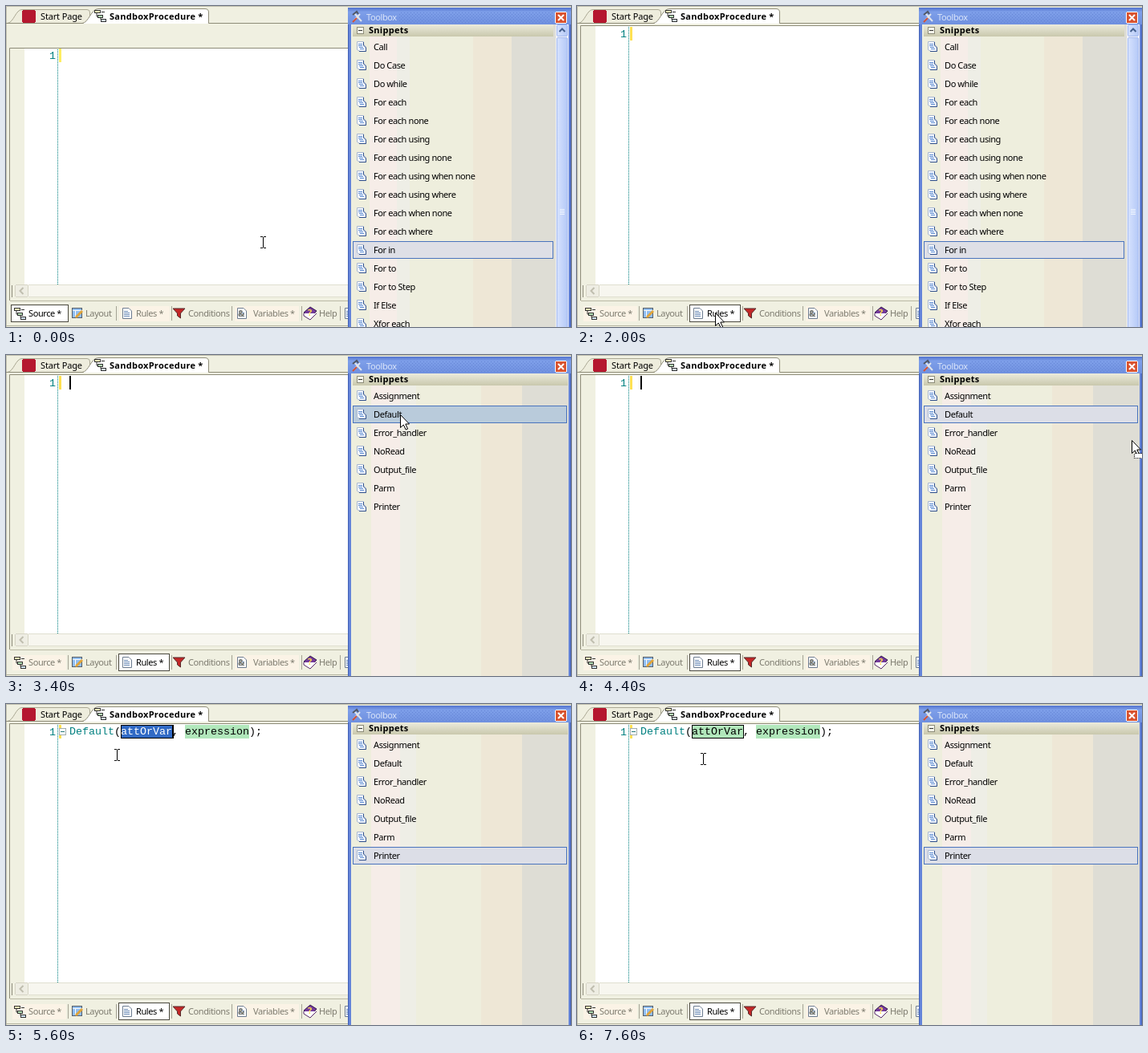
An HTML page for the animation above (8000 ms loop, 704 by 400 pixels).

```html
<!DOCTYPE html>
<html lang="en">
<head>
<meta charset="utf-8">
<title>Snippet toolbox</title>
<style>
html, body { margin: 0; width: 100%; height: 100%; overflow: hidden; background: #f0f0e1; }
svg { display: block; width: 704px; height: 400px; }
text { font: 11px "Noto Sans", "Open Sans", sans-serif; letter-spacing: -.4px; white-space: pre; }
.bold { font-weight: 700; letter-spacing: .27px; }
.code { font: 13.33px "Liberation Mono", "Courier New", monospace; letter-spacing: 0; }
.teal { fill: #008080; }
.dim text { fill: #7d7b6f; }
rect, line, .crisp { shape-rendering: crispEdges; }
.t { animation: 8s step-end infinite; }

/* panes */
.source { animation-name: source }
.rules { animation-name: rules }
.listA { animation-name: listA }
.listB { animation-name: listB }
.hover { animation-name: hover }
.picked { animation-name: picked }
.inserted { animation-name: inserted }
.selected { animation-name: selected }
@keyframes source { 0% { opacity: 1 } 25%, to { opacity: 0 } }
@keyframes rules { 0% { opacity: 0 } 25%, to { opacity: 1 } }
@keyframes listA { 0% { opacity: 1 } 27.5%, to { opacity: 0 } }
@keyframes listB { 0% { opacity: 0 } 27.5%, to { opacity: 1 } }
@keyframes hover { 0% { opacity: 0 } 40% { opacity: 1 } 47.5%, to { opacity: 0 } }
@keyframes picked { 0% { opacity: 0 } 47.5% { opacity: 1 } 67.5%, to { opacity: 0 } }
@keyframes inserted { 0% { opacity: 0 } 67.5%, to { opacity: 1 } }
@keyframes selected { 0% { opacity: 0 } 67.5% { opacity: 1 } 87.5%, to { opacity: 0 } }

/* blinking carets */
.caretStart { animation-name: caretStart }
.caretEnd { animation-name: caretEnd }
.caretClick { animation-name: caretClick }
@keyframes caretStart {
  0%, 32.5%, 47.5%, 67.5%, to { opacity: 0 }
  27.5%, 40%, 55% { opacity: 1 }
}
@keyframes caretEnd { 0%, 77.5%, 87.5%, to { opacity: 0 } 67.5%, 85% { opacity: 1 } }
@keyframes caretClick { 0%, 95%, to { opacity: 0 } 87.5% { opacity: 1 } }

/* pointer */
.move { animation-name: move }
.ibeam { animation-name: ibeam }
.arrow { animation-name: arrow }
.resize { animation-name: resize }
.drag { animation-name: drag }
@keyframes ibeam { 0%, 32.5%, 67.5%, to { opacity: 1 } 15%, 37.5% { opacity: 0 } }
@keyframes arrow { 0%, 32.5%, 47.5%, to { opacity: 0 } 15%, 40% { opacity: 1 } }
@keyframes resize { 0%, 40%, to { opacity: 0 } 37.5% { opacity: 1 } }
@keyframes drag { 0%, 67.5%, to { opacity: 0 } 47.5% { opacity: 1 } }
@keyframes move {
  0% { transform: translate(320px, 294px) }
  2.5% { transform: translate(135px, 173px) }
  7.5% { transform: translate(122px, 215px) }
  10% { transform: translate(100px, 275px) }
  12.5% { transform: translate(76px, 330px) }
  15% { transform: translate(80px, 368px) }
  17.5% { transform: translate(120px, 380px) }
  20% { transform: translate(160px, 381px) }
  22.5% { transform: translate(172px, 382px) }
  32.5% { transform: translate(232px, 340px) }
  35% { transform: translate(335px, 275px) }
  37.5% { transform: translate(428px, 210px) }
  40% { transform: translate(485px, 82px) }
  42.5% { transform: translate(491px, 74px) }
  47.5% { transform: translate(691px, 106px) }
  62.5% { transform: translate(400px, 78px) }
  65% { transform: translate(235px, 66px) }
  67.5% { transform: translate(139px, 62px) }
  70% { transform: translate(138px, 63px) }
  72.5% { transform: translate(129px, 55px) }
  75% { transform: translate(122px, 48px) }
  77.5% { transform: translate(120px, 41px) }
  80% { transform: translate(119px, 35px) }
  92.5% { transform: translate(140px, 52px) }
  95%, to { transform: translate(157px, 68px) }
}
</style>
</head>
<body>
<svg viewBox="0 0 704 400">
  <defs>
    <linearGradient id="head" x2="0" y2="1">
      <stop stop-color="#ecebdc"/><stop offset="1" stop-color="#c9c8ad"/>
    </linearGradient>
    <linearGradient id="title" x2="0" y2="1">
      <stop stop-color="#5273ce"/><stop offset=".25" stop-color="#7e9fe9"/><stop offset="1" stop-color="#6f90df"/>
    </linearGradient>
    <linearGradient id="thumb">
      <stop stop-color="#d6e2fe"/><stop offset="1" stop-color="#b5c9f7"/>
    </linearGradient>
    <pattern id="weave" width="4" height="4" patternUnits="userSpaceOnUse">
      <path d="M0 0h1v1h-1zM2 2h1v1h-1z" fill="#6484d5"/>
    </pattern>
    <g id="page">
      <path d="M.5 .5H8.500V4L11.500 7V12.500H4L.5 10.500Z" fill="#f6f9ff" stroke="#a9b8d0"/>
      <path d="M2 3.500H7M2 5.500H7M3 7.500H8M4 9.500H9" stroke="#5a8ad0"/>
      <path d="M8.500 1V5L11.500 8V12.500H3" fill="none" stroke="#2f4f8a"/>
    </g>
    <g id="flow">
      <path d="M3 4V8H8M8 9V12H12M9 2.500H13" fill="none" stroke="#333"/>
      <rect x=".5" y=".5" width="7" height="3" fill="#f4f0b8" stroke="#333"/>
      <rect x="4.500" y="6.500" width="6" height="3" fill="#b5dfb5" stroke="#333"/>
      <rect x="8.500" y="11.500" width="6" height="3" fill="#d4e4f4" stroke="#333"/>
    </g>
    <g id="sheet">
      <path d="M.5 .5H8L11.500 4V13.500H.5Z" fill="#fff" stroke="#6d7c90"/>
      <path d="M2 4.500H7M2 6.500H9M2 8.500H9M2 10.500H9" stroke="#6d8db8"/>
    </g>
    <path id="pointer" d="M.5 .5V16.500L4.300 13 7.200 19 9.600 18 6.800 12H11.500Z" fill="#fff" stroke="#000"/>
  </defs>

  <rect width="704" height="400" fill="#f0f0e1"/>
  <path d="M0 .5H704M.5 0V400" stroke="#c0bfae"/>
  <path d="M0 398.500H427" stroke="#b4b39f"/>

  <!-- document tabs -->
  <path d="M2 21.500C10 20 12 4.500 20 4.500H101Q104.500 4.500 104.500 8V21.500" fill="#eeeddd" stroke="#aaa893"/>
  <rect x="20" y="5" width="17" height="16" rx="3" fill="#b5172f"/>
  <text x="43" y="17" style="letter-spacing:-.15px">Start Page</text>
  <path d="M0 21.500H427" stroke="#8e8c78"/>
  <path d="M95 21.500C103 21 106 3.500 115 3.500H248Q252.500 3.500 252.500 8V21.500" fill="#fff" stroke="#8e8c78"/>
  <rect x="97" y="21" width="155" height="1" fill="#fff"/>
  <use href="#flow" x="110" y="5"/>
  <text x="129" y="17" class="bold">SandboxProcedure *</text>

  <!-- editor -->
  <g class="t source">
    <path d="M4.500 367V52.500H427" fill="none" stroke="#8e8c78"/>
    <rect x="23" y="53" width="404" height="295" fill="#fff"/>
    <line x1="64.500" y1="54" x2="64.500" y2="347" stroke="#008080" stroke-dasharray="1 1"/>
    <rect x="66" y="53" width="3" height="17" fill="#ffee62"/>
    <text x="54" y="66" class="code teal">1</text>
  </g>
  <g class="t rules">
    <path d="M4.500 367V24.500H427" fill="none" stroke="#8e8c78"/>
    <rect x="23" y="25" width="404" height="323" fill="#fff"/>
    <line x1="64.500" y1="26" x2="64.500" y2="347" stroke="#008080" stroke-dasharray="1 1"/>
    <rect x="66" y="26" width="3" height="17" fill="#ffe052"/>
    <text x="54" y="39" class="code teal">1</text>
  </g>
  <g class="t inserted">
    <rect x="143.500" y="26.500" width="64" height="16" fill="#b1e7bb" stroke="#000"/>
    <rect x="223" y="26" width="80" height="17" fill="#b1e7bb"/>
    <rect x="66.500" y="30.500" width="8" height="8" fill="#fff" stroke="#a2adad"/>
    <path d="M68 34.500H73" stroke="#287878"/>
    <text x="79" y="38" class="code"><tspan class="teal">Default</tspan>(attOrVar, expression);</text>
  </g>
  <g class="t selected">
    <rect x="143.500" y="26.500" width="64" height="16" fill="#316ac5" stroke="#000"/>
    <text x="143" y="38" class="code" fill="#fff">attOrVar</text>
  </g>
  <rect class="t caretStart" x="79" y="26" width="2" height="17"/>
  <rect class="t caretEnd" x="207" y="26" width="2" height="17"/>
  <rect class="t caretClick" x="119" y="26" width="2" height="17"/>

  <!-- horizontal scrollbar -->
  <rect x="11" y="347" width="416" height="16" fill="#f7f6ef"/>
  <path d="M28 347.500H427M28 362.500H427" stroke="#e0dfd0"/>
  <path d="M7.500 348V363" stroke="#8a8878"/>
  <rect x="11.500" y="347.500" width="16" height="15" rx="2" fill="#eeede3" stroke="#d6d4c5"/>
  <path d="M21.500 351L17.500 355L21.500 359" fill="none" stroke="#c0beaf" stroke-width="2"/>
  <path d="M5 367.500H427" stroke="#bab8a4"/>

  <!-- part tabs -->
  <g class="dim">
    <g fill="none" stroke="#565e69">
      <rect x="82.500" y="376.500" width="12" height="12" fill="#8fbdf0"/>
      <path d="M83 379.500H95M86.500 380V388" stroke="#fff"/>
      <path d="M87 388L95 380" stroke="#e0a439" stroke-width="3"/>
    </g>
    <text x="99" y="387">Layout</text>
    <g class="t source"><rect x="141" y="374" width="63" height="19" fill="#fbf3e6"/></g>
    <rect x="285" y="374" width="80" height="19" fill="#fbf3e6"/>
    <path d="M208 377H223L217.500 383V389L213.500 386V383Z" fill="#c32727" stroke="#552b2b"/>
    <text x="227" y="387">Conditions</text>
    <use href="#sheet" x="288" y="376"/>
    <text x="289" y="387" style="font-weight:700">&amp;</text>
    <text x="308" y="387">Variables *</text>
    <path d="M371 382L379 375L387 380L379 389Z" fill="#743a9c" stroke="#35184b"/>
    <path d="M371 383V386L379 391L387 383" fill="#fff" stroke="#542668"/>
    <text x="376" y="386" style="font-weight:700;fill:#ffdf4b">?</text>
    <text x="390" y="387">Help</text>
    <use href="#sheet" x="422" y="376"/>
    <path d="M137.500 374V392M206.500 374V392M281.500 374V392M368.500 374V392M416.500 374V392" stroke="#a5a394"/>
  </g>
  <g class="t source">
    <rect x="6.500" y="372.500" width="71" height="21" fill="#fff" stroke="#4a483e"/>
    <text x="28" y="387">Source *</text>
    <g class="dim"><text x="162" y="387">Rules *</text></g>
  </g>
  <g class="t rules">
    <rect x="8" y="374" width="67" height="19" fill="#fbf3e6"/>
    <g class="dim"><text x="28" y="387">Source *</text></g>
    <path d="M77.500 374V392" stroke="#a5a394"/>
    <rect x="140.500" y="372.500" width="63" height="21" fill="#fff" stroke="#4a483e"/>
    <text x="162" y="387">Rules *</text>
  </g>
  <use href="#flow" x="10" y="376"/>
  <use href="#sheet" x="145" y="376"/>

  <!-- toolbox -->
  <rect x="426" y="2" width="278" height="398" fill="#6484d9"/>
  <path d="M426.500 2V400M703.500 2V400" stroke="#4261b7"/>
  <rect x="426" y="2" width="278" height="21" fill="url(#title)"/>
  <rect x="490" y="7" width="192" height="14" fill="url(#weave)"/>
  <path d="M433 19L441 10M434 9L443 19" stroke="#e0e4ea" stroke-width="2"/>
  <path d="M432 11L437 7L439 10" fill="none" stroke="#505867" stroke-width="2"/>
  <path d="M432 20L437 15" stroke="#cb4f39" stroke-width="2"/>
  <text x="449" y="18" fill="#d9e4fa">Toolbox</text>
  <rect x="684.500" y="7.500" width="14" height="14" rx="2" fill="#d9532f" stroke="#fff"/>
  <path d="M688 11L695 18M695 11L688 18" stroke="#fff" stroke-width="2"/>
  <g class="t listA" id="listA"></g>
  <g class="t listB" id="listB"></g>

  <!-- pointer -->
  <g class="t move">
    <path class="t ibeam crisp" d="M-3 -6.500H0M1 -6.500H4M.5 -6V7M-3 7.500H0M1 7.500H4" fill="none" stroke="#000"/>
    <g class="t arrow"><use href="#pointer"/></g>
    <path class="t resize" d="M-9 0L-5 -4V-1H6V-4L10 0L6 4V1H-5V4Z"/>
    <g class="t drag">
      <use href="#pointer"/>
      <rect x="3.500" y="16.500" width="11" height="6" fill="#fff" stroke="#000" stroke-dasharray="1 1"/>
    </g>
  </g>
</svg>
<script>
const rect = (x, y, w, h, fill, more = '') =>
  `<rect x="${x}" y="${y}" width="${w}" height="${h}" fill="${fill}" ${more}/>`;

const mark = (row, right, fill, cls = '') =>
  rect(432.5, 40.5 + 23 * row, right - 433, 21, fill, `stroke="#4a74bd" class="${cls}"`);

// stops: left edges of the coloured bands after the first one
function list(id, right, stops, names, marks, extra = '') {
  const tints = ['#f6ede8', '#eeeee6', '#eeeedd', '#eee7d6', '#deddd5'];
  const bands = stops.map((x, i) => rect(x, 23, right - x, 377, tints[i])).join('');
  const rows = names.map((name, i) =>
    `<use href="#page" x="437" y="${44 + 23 * i}"/><text x="458" y="${55 + 23 * i}">${name}</text>`).join('');
  document.getElementById(id).innerHTML =
    rect(430, 23, right - 430, 377, '#eeeedd') + bands +
    rect(432, 23, right - 433, 15, 'url(#head)') +
    rect(437.5, 26.5, 8, 8, '#f5f5ec', 'stroke="#8d8c78"') +
    '<path d="M439 30.500H444" stroke="#333"/>' +
    '<text x="452" y="34" class="bold">Snippets</text>' + marks + rows + extra;
}

const scrollbar =
  rect(685, 23, 16, 377, '#f0f2fb') +
  rect(686.5, 23.5, 13, 14, 'url(#thumb)', 'rx="2" stroke="#a6bbee"') +
  '<path d="M689.500 32L693 28.500L696.500 32" fill="none" stroke="#46618f" stroke-width="2"/>' +
  rect(686.5, 39.5, 13, 370, 'url(#thumb)', 'rx="2" stroke="#a6bbee"') +
  '<path d="M690 253.500H696M690 255.500H696M690 257.500H696M690 259.500H696" stroke="#eef4fe"/>';

list('listA', 683, [453, 487, 503, 582, 630],
  ['Call', 'Do Case', 'Do while', 'For each', 'For each none', 'For each using',
   'For each using none', 'For each using when none', 'For each using where',
   'For each when none', 'For each where', 'For in', 'For to', 'For to Step',
   'If Else', 'Xfor each'],
  mark(11, 682, '#dedfe6'), rect(683, 23, 2, 377, '#deddd5') + scrollbar);

list('listB', 701, [455, 491, 511, 592, 643],
  ['Assignment', 'Default', 'Error_handler', 'NoRead', 'Output_file', 'Parm', 'Printer'],
  mark(1, 699, '#b9cbdb', 't hover') + mark(1, 699, '#dcdee7', 't picked') +
  mark(6, 699, '#dcdee7', 't inserted'));
</script>
</body>
</html>
```
